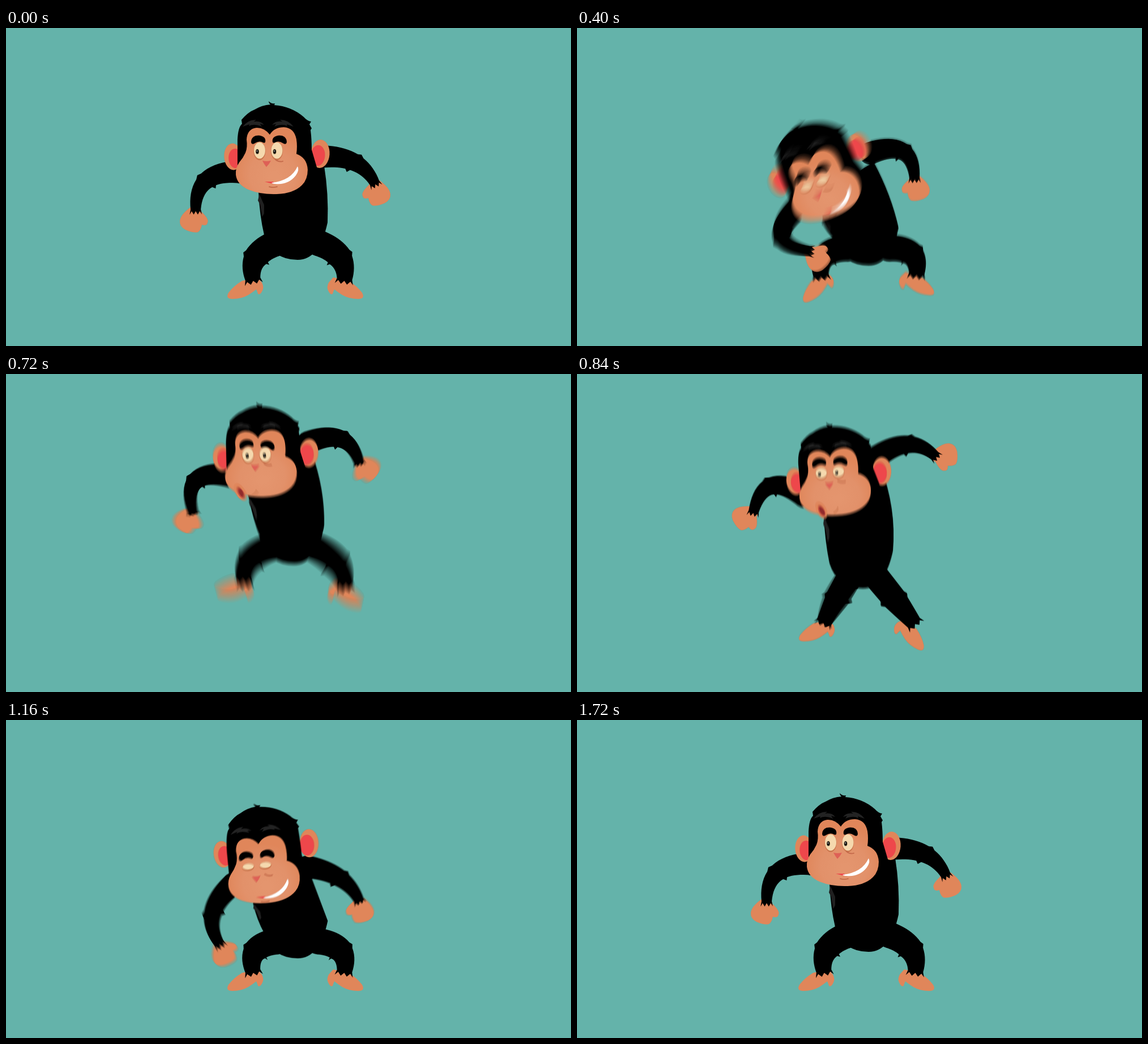
Write an HTML page with a canvas that moves like this. It is 998 px wide and 561 px high and loops after 1.76 s.

```html
<!DOCTYPE html>
<html lang="en">
<head>
<meta charset="utf-8">
<title>Jumping chimp</title>
<style>
  html, body { margin: 0; width: 100%; height: 100%; overflow: hidden; background: #64b3aa; }
  canvas { display: block; }
</style>
</head>
<body>
<canvas id="stage" width="998" height="561"></canvas>
<script>
const W = 998, H = 561, LOOP = 1760, STEP = 40, SHUTTER = 28, SAMPLES = 18;
const BG = '#64b3aa', FUR = '#000', SKIN = '#e0865a', RED = '#ee474b';
const RAD = Math.PI / 180;

// head: x, y, turn, nod; hands and feet: x, y, turn; eyes: opening, surprise.
// Everything else (elbows, knees, torso, ears, features) follows from these.
const rest = {
  head: [466, 235, 0, 0], shoulder: [556, 227], hip: [515, 409], eyes: [1, 0],
  handL: [335, 320, 0], handR: [651, 273, 0], footL: [436, 443, 0], footR: [598, 443, 0]
};
const launch = {
  head: [430, 280, -22, 1], shoulder: [518, 221], hip: [515, 419], eyes: [.4, 0],
  handL: [411, 394, -62], handR: [596, 265, 3], footL: [431, 437, -22], footR: [600, 434, 4]
};
const dip = { ...launch, head: [414, 300, -28, 1.1], hip: [515, 425], footL: rest.footL, footR: rest.footR };
const push = {
  head: [446, 205, -5, .6], shoulder: [532, 165], hip: [512, 365], eyes: [.8, .6],
  handL: [376, 330, -45], handR: [606, 220, 4], footL: [424, 400, -25], footR: [603, 402, 20]
};
const air = {
  head: [443, 145, 1, .4], shoulder: [536, 112], hip: [512, 311], eyes: [1, 1],
  handL: [352, 242, -14], handR: [613, 172, 0], footL: [408, 311, 24], footR: [603, 322, -12]
};
const land = {
  head: [451, 192, -5, 0], shoulder: [530, 146], hip: [505, 378], eyes: [.65, .2],
  handL: [312, 242, 40], handR: [632, 144, -75], footL: [437, 437, 0], footR: [595, 439, 25]
};
const squat = {
  ...rest, head: [449, 269, -6, 1.1], shoulder: [530, 262], hip: [515, 422], eyes: [.3, 0],
  handL: [382, 402, -44], handR: [620, 321, 3]
};
const rebound = {
  ...rest, head: [466, 232, 0, 0], shoulder: [556, 230], hip: [516, 405],
  handL: [325, 321, 0], handR: [651, 278, 0]
};
const KEYS = [[0, rest], [320, dip], [400, launch], [470, push], [620, air],
  [840, land], [1100, squat], [1420, rebound], [1720, rest]];

// Monotone cubic interpolation: eased, never overshooting a key.
function sample(part, time) {
  const last = KEYS.length - 1;
  if (time >= KEYS[last][0]) return KEYS[last][1][part];
  const k = KEYS.findIndex((key, i) => time < KEYS[i + 1][0]);
  const span = KEYS[k + 1][0] - KEYS[k][0], u = (time - KEYS[k][0]) / span;
  const rise = (i, c) =>
    (KEYS[i + 1][1][part][c] - KEYS[i][1][part][c]) / (KEYS[i + 1][0] - KEYS[i][0]);
  const tangent = (i, c) => {
    if (i === 0 || i === last) return 0;
    const p = rise(i - 1, c), q = rise(i, c);
    return p * q <= 0 ? 0 : 2 * p * q / (p + q);
  };
  return KEYS[k][1][part].map((v, c) => {
    const m = tangent(k, c) * span, n = tangent(k + 1, c) * span, d = rise(k, c) * span;
    return v + u * (m + u * (3 * d - 2 * m - n + u * (m + n - 2 * d)));
  });
}

const stage = document.getElementById('stage').getContext('2d');
const buffer = document.createElement('canvas');
buffer.width = W; buffer.height = H;
const g = buffer.getContext('2d');

function fill(color, path) { g.fillStyle = color; g.fill(new Path2D(path)); }

function oval(color, x, y, rx, ry, tilt = 0) {
  g.fillStyle = color;
  g.beginPath();
  g.ellipse(x, y, rx, ry, tilt * RAD, 0, 2 * Math.PI);
  g.fill();
}

function line(color, width, path) {
  g.strokeStyle = color;
  g.lineWidth = width;
  g.lineCap = 'round';
  g.stroke(new Path2D(path));
}

function placed(x, y, angle, flip, draw) {
  g.save();
  g.translate(x, y);
  g.rotate(angle * RAD);
  g.scale(flip, 1);
  draw();
  g.restore();
}

// Tapered curve of fixed reach: the closer its ends, the further the joint bows outward.
function limb([sx, sy], [ex, ey], { reach, bow, widths: [w0, w1, w2] }, flip) {
  const dx = ex - sx, dy = ey - sy, d = Math.hypot(dx, dy);
  const out = bow * Math.sqrt(Math.max(0, reach * reach - d * d)) / d * flip;
  const cx = sx + dx * .58 - 2 * dy * out, cy = sy + dy * .58 + 2 * dx * out;
  const inner = [], outer = [], n = 20;
  let tx, ty;
  for (let i = 0; i <= n; i++) {
    const u = i / n, v = 1 - u;
    const x = v * v * sx + 2 * u * v * cx + u * u * ex;
    const y = v * v * sy + 2 * u * v * cy + u * u * ey;
    const angle = Math.atan2(v * (cy - sy) + u * (ey - cy), v * (cx - sx) + u * (ex - cx));
    tx = Math.cos(angle); ty = Math.sin(angle);
    const r = (u < .5 ? w0 + (w1 - w0) * 2 * u : w1 + (w2 - w1) * (2 * u - 1)) / 2;
    const ri = (r + (i === 9 ? 5 : 0)) * flip, ro = (r + (i === 11 ? 3 : 0)) * flip;
    inner.push([x + ty * ri, y - tx * ri]);
    outer.unshift([x - ty * ro, y + tx * ro]);
  }
  const cuff = [];
  for (let i = 0; i < 7; i++) {
    const across = (1.2 - .4 * i) * w2 / 2 * flip, along = i % 2 ? 3 : 9;
    cuff.push([ex + ty * across + tx * along, ey - tx * across + ty * along]);
  }
  fill(FUR, 'M' + [...inner, ...cuff, ...outer].join('L') + 'Z');
  oval(FUR, sx, sy, w0 / 2, w0 / 2);
}

const ARM_L = { reach: 120, bow: .45, widths: [40, 31, 18] };
const ARM_R = { ...ARM_L, reach: 112 };
const LEG = { reach: 102, bow: .25, widths: [46, 43, 27] };

function arm(shoulder, hand, build, flip) {
  placed(...hand, flip, () => fill(SKIN,
    'M-9 -4Q-27 9 -28 20Q-29 30 -18 36Q-4 42 4 40Q9 37 11 27Q20 30 21 23Q24 17 10 4L8 -4Z'));
  limb(shoulder, hand, build, flip);
}

function leg([hx, hy], foot, flip) {
  const [x, y, turn] = foot;
  const spread = 36 - .75 * Math.max(0, y - hy - 34);
  placed(x - (flip < 0 ? 12 : 0), y + 2, turn, flip, () => fill(SKIN,
    'M-19 1Q-34 10 -43 22Q-49 33 -36 33Q-20 33 -8 26Q0 21 6 16Q8 20 9 24Q13 27 17 18Q20 12 16 4L8 -5Z'));
  limb([hx - spread * flip, hy - 30], foot, LEG, flip);
}

function torso([nx, ny], [sx, sy], [hx, hy], [cx, cy]) {
  const lx = hx - 59, ly = hy - 44, rx = hx + 53, ry = hy - 66;
  const bulge = Math.max(0, ry - sy - 96) * .25;
  fill(FUR, `M${nx} ${ny}Q${(nx + lx) / 2 - 3} ${(ny + ly) / 2 + 4} ${lx} ${ly}
    Q${lx + 14} ${hy} ${hx} ${hy}Q${rx - 14} ${hy} ${rx} ${ry}
    Q${(rx + sx) / 2 + 3 + bulge} ${(ry + sy) / 2 + 8} ${sx + 6} ${sy + 16}L${cx + 20} ${cy}Z`);
  const at = (u, side) => `${nx + (lx - nx) * u + side} ${ny + (ly - ny) * u}`;
  fill('#202020', `M${at(.05, 1)}L${at(.2, -3)}L${at(.3, 0)}L${at(.58, 1)}L${at(.5, 5)}L${at(.3, 7)}Z`);
}

function eye(x, y, open, look) {
  oval('#c9754c', x, y + 1, 10.5, 15 * open + 1);
  oval('#f5d9ae', x, y, 10, 14.5 * open);
  if (open < .5) return;
  oval('#8d7d5c', x + look, y + 2, 3, 4.6 * open);
  oval('#0a0806', x + look, y + 2, 2.4, 3.8 * open);
  oval('#fff', x + look - .4, y + 1, .8, open);
}

function brow(x, y, tilt, flip) {
  placed(x, y, tilt, flip, () => fill(FUR,
    'M-13 4Q-13 -4 -5 -7Q4 -9 10 -4Q13 -1 12 4Q11 7 6 4Q0 2 -6 6Q-12 10 -13 4Z'));
}

function smile() {
  fill(RED, 'M-9 36Q0 36 6 36L9 40Q0 39 -9 36Z');
  fill('#fff', 'M3 38Q38 34 49 9Q53 15 46 25Q33 42 10 40Q5 40 3 38Z');
  line('#bd6543', 1.6, 'M-1 45Q5 47 13 45');
}

function pucker(x) {
  placed(x, 46, -25, 1, () => {
    oval(SKIN, 0, 1, 8.5, 15);
    oval('#c04a40', 0, 2, 5, 10);
    oval('#8f2b2c', .5, 2, 3.2, 8);
  });
  line('#c9754c', 1.2, `M${x + 22} 54Q${x + 29} 50 ${x + 30} 45`);
}

function ear(x, y, size, inward) {
  oval(SKIN, x, y, 16 * size, 24 * size, -4 * inward);
  oval(RED, x + 4 * inward, y + 3, 12 * size, 17.5 * size, -4 * inward);
}

function head([x, y, turn, nod], [open, surprise], puckered) {
  placed(x, y, turn, 1, () => {
    ear(-65, -8 - 27 * nod, .98, 1);
    ear(89, -13 - 27 * nod, 1.04, -1);
    const top = -13 * nod;
    fill(FUR, `M-57 14L-57 -38Q-56 ${-60 + top} -49 ${-66 + top}L-50 ${-73 + top}
      Q-38 ${-87 + top} -27 ${-91 + top}Q-14 ${-99 + top} 1 ${-100 + top}
      Q-2 ${-103 + top} -2 ${-106 + top}Q2 ${-101 + top} 9 ${-102 + top}L8 ${-99 + top}
      Q38 ${-97 + top} 60 ${-78 + top}Q66 ${-71 + top} 73 ${-70 + top}
      L70 ${-65 + top}L74 ${-58 + top}L72 ${-55 + top}Q74 -40 74 -20L84 14Q76 30 50 42L0 45Z`);
    for (const [lockX, flip] of [[-29, 1], [23, -1]])
      placed(lockX, -67 + top / 2, 0, flip, () => fill('#232323',
        'M-19 6Q-9 -7 5 -6L1 -3Q13 -5 19 3L12 1L15 6Q1 0 -8 5L-7 2Z'));

    const blush = g.createRadialGradient(8, 28, 8, 4, 20, 68);
    blush.addColorStop(0, '#e4956e');
    blush.addColorStop(.55, '#e2916a');
    blush.addColorStop(1, SKIN);
    fill(blush, `M0 -47Q-10 -60 -24 -59Q-40 -57 -41 -38Q-39 -25 -43 -15Q-47 -6 -54 2
      Q-61 12 -60 24Q-58 41 -38 50Q-16 59 12 58Q42 57 57 42Q67 32 67 15
      Q66 -6 47 -13Q49 -26 47 -39Q43 -59 25 -60Q8 -60 0 -47Z`);

    g.translate(-4 * nod, 10 * nod);
    const look = -4 * (1 - surprise);
    eye(-18, -19, open, look);
    eye(12.5, -19, open, look);
    line('#c4694a', 1.8, 'M10 -3Q16 2 23 0');
    brow(-20, -38, -8 * surprise, 1);
    brow(17, -38 + 4 * surprise, 14 * surprise, -1);
    fill('#de6056', 'M-13 -1Q-6 1 2 -1Q-1 5 -6 10Q-10 5 -13 -1Z');
    if (puckered) pucker(-20 - 19 * surprise);
    else smile();
  });
}

// A point fixed to the head, carried along by its turn.
function onHead([x, y, turn], dx, dy) {
  const c = Math.cos(turn * RAD), s = Math.sin(turn * RAD);
  return [x + dx * c - dy * s, y + dx * s + dy * c];
}

function drawPose(time) {
  time = (time + LOOP) % LOOP;
  g.fillStyle = BG;
  g.fillRect(0, 0, W, H);
  const pose = {};
  for (const part in rest) pose[part] = sample(part, time);
  leg(pose.hip, pose.footL, 1);
  leg(pose.hip, pose.footR, -1);
  torso(onHead(pose.head, -20, 54), pose.shoulder, pose.hip, pose.head);
  arm(onHead(pose.head, -51, 19), pose.handL, ARM_L, 1);
  arm(pose.shoulder, pose.handR, ARM_R, -1);
  head(pose.head, pose.eyes, time > 460 && time < 960);
}

// Averaging several moments inside the shutter gives the motion blur.
function drawFrame(time) {
  for (let i = 0; i < SAMPLES; i++) {
    drawPose(time + SHUTTER * ((i + .5) / SAMPLES - .5));
    stage.globalAlpha = 1 / (i + 1);
    stage.drawImage(buffer, 0, 0);
  }
}

let shown = -1;
function tick() {
  const frame = Math.floor(performance.now() % LOOP / STEP);
  if (frame !== shown) drawFrame((shown = frame) * STEP);
  requestAnimationFrame(tick);
}
tick();
</script>
</body>
</html>
```
